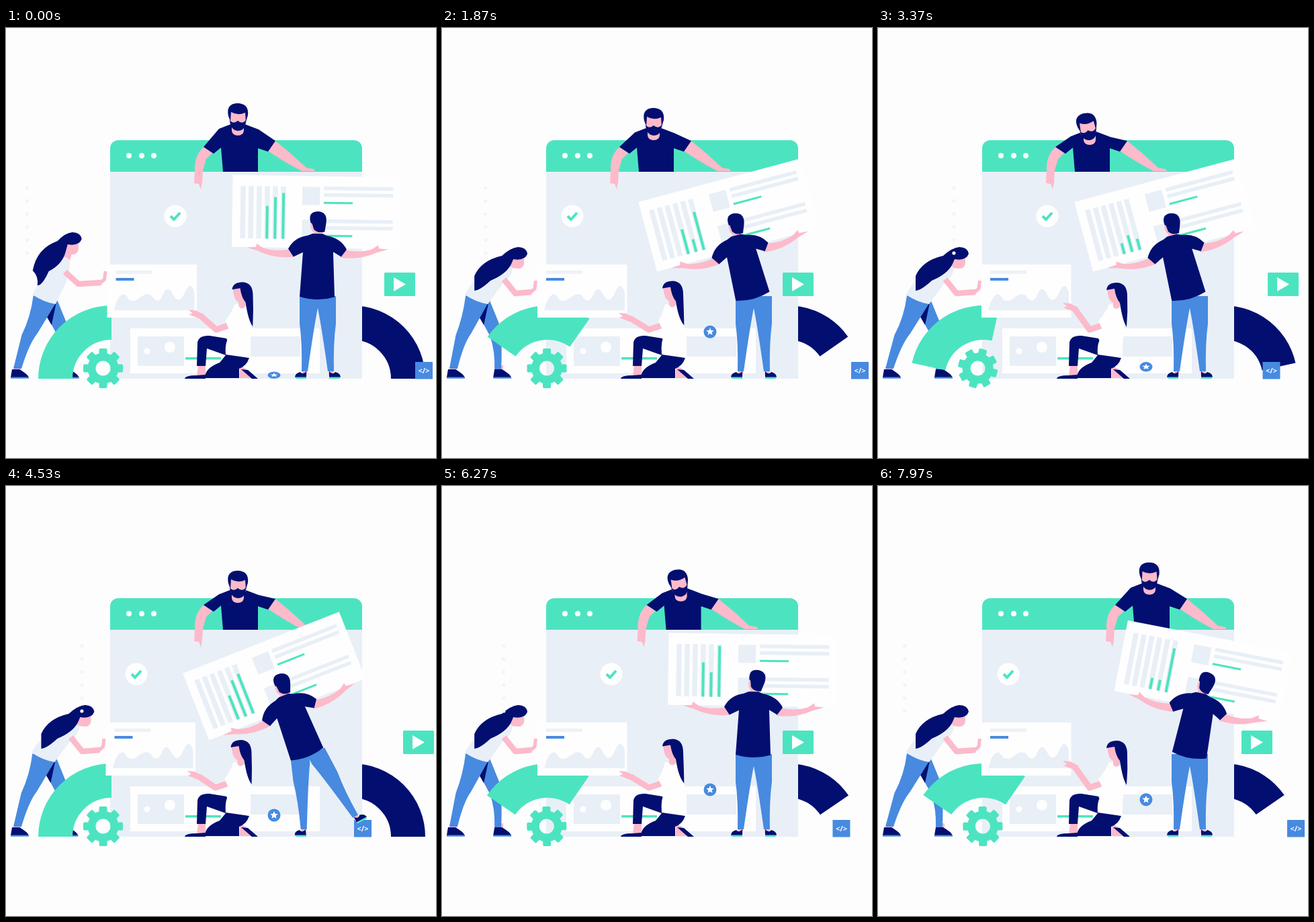
These frames come from a looping animation (640x640 px, 8 s). An HTML page with a canvas:

```html
<!DOCTYPE html>
<html lang="en">
<head>
<meta charset="utf-8">
<title>Building a page together</title>
<style>
  html, body { margin: 0; width: 100%; height: 100%; overflow: hidden; background: #fdfdfd; }
  canvas { display: block; width: 100vw; height: 100vh; object-fit: contain; }
</style>
</head>
<body>
<canvas width="640" height="640"></canvas>
<script>
const ctx = document.querySelector('canvas').getContext('2d');
const LOOP = 8000, DEG = Math.PI / 180;
const WHITE = '#fefefe', PAPER = '#fdfdfd', PALE = '#e9eff7', GREEN = '#4ce4c0',
      NAVY = '#020f70', BLUE = '#478ae0', SKIN = '#fcbacb', GREY = '#eef1f5';

// Sine easing through a few points [time, value, time, value, ...]; equal neighbours hold.
function track(t, keys) {
  if (t <= keys[0]) return keys[1];
  for (let i = 2; i < keys.length; i += 2) {
    if (t > keys[i]) continue;
    const p = (t - keys[i - 2]) / (keys[i] - keys[i - 2]);
    return keys[i - 1] + (keys[i + 1] - keys[i - 1]) * (1 - Math.cos(Math.PI * p)) / 2;
  }
  return keys[keys.length - 1];
}
// 0 at each multiple of the period, thrown up to 1, a pause, and falling back.
function bounce(t, period, rise) {
  const phase = t % period;
  const p = Math.min(1, Math.min(phase, period - phase) / rise);
  return 1 - (1 - p) ** 2;
}
const wave = (t, period, peak) => Math.cos(2 * Math.PI * (t - peak) / period);

function fill(color, d) {
  ctx.fillStyle = color;
  ctx.fill(new Path2D(d));
}
function rect(color, x, y, w, h, radius = 0) {
  ctx.fillStyle = color;
  ctx.beginPath();
  ctx.roundRect(x, y, w, h, radius);
  ctx.fill();
}
function ellipse(color, x, y, rx, ry = rx) {
  ctx.fillStyle = color;
  ctx.beginPath();
  ctx.ellipse(x, y, rx, ry, 0, 0, 7);
  ctx.fill();
}
function line(color, width, d) {
  ctx.strokeStyle = color;
  ctx.lineWidth = width;
  ctx.lineJoin = 'round';
  ctx.stroke(new Path2D(d));
}
function group(x, y, draw) {
  ctx.save();
  ctx.translate(x, y);
  draw();
  ctx.restore();
}
function turn(x, y, degrees, draw) {
  group(x, y, () => {
    ctx.rotate(degrees * DEG);
    ctx.translate(-x, -y);
    draw();
  });
}
function mirror(width, draw) {
  group(width, 0, () => {
    ctx.scale(-1, 1);
    draw();
  });
}

function quarterRing(color, x, degrees) {
  ctx.strokeStyle = color;
  ctx.lineWidth = 51;
  ctx.beginPath();
  ctx.arc(x, 522, 83.5, degrees * DEG, (degrees + 90) * DEG);
  ctx.stroke();
}

function gear(x, y, degrees) {
  turn(x, y, degrees, () => {
    ctx.strokeStyle = GREEN;
    ctx.lineWidth = 12;
    ctx.beginPath();
    ctx.arc(x, y, 17, 0, 7);
    ctx.stroke();
    for (let i = 0; i < 8; i++) turn(x, y, i * 45, () => rect(GREEN, x - 6, y - 29.5, 12, 11, 2));
  });
}

function windowFrame() {
  rect(GREEN, 155, 167, 375, 60, [12, 12, 0, 0]);
  rect(PALE, 155, 214, 375, 308);
  for (const x of [183, 202, 220]) ellipse(WHITE, x, 190, 4);
}

function panel() {
  rect(WHITE, 185, 447, 282, 67);
  rect(PALE, 196, 459, 69, 44);
  ellipse(WHITE, 244, 475, 8);
  ellipse(WHITE, 210, 481, 4.5);
  rect(GREEN, 267, 490, 53, 3.5);
  rect(PALE, 364, 459, 74, 30);
}

function checkBadge(x) {
  ellipse(WHITE, x, 280, 16.5);
  line(GREEN, 4, `M${x - 7} 280l5 5l9 -10`);
}

function starBadge(y) {
  const squash = 1 - Math.max(0, y - 491) * 0.018;
  group(399, y, () => {
    ctx.scale(1, squash);
    ellipse(BLUE, 0, 0, 9.5);
    let d = '';
    for (let i = 0; i < 10; i++) {
      const r = i % 2 ? 2.7 : 6, a = (i * 36 - 90) * DEG;
      d += (i ? 'L' : 'M') + r * Math.cos(a) + ' ' + r * Math.sin(a);
    }
    fill(WHITE, d + 'Z');
  });
}

function playBadge(x) {
  group(x, 364, () => {
    rect(GREEN, 0, 0, 46, 35, 1.5);
    fill(WHITE, 'M14 7V28L32 17.5Z');
  });
}

function codeBadge(x) {
  rect(BLUE, x, 497, 26, 25.5);
  ctx.fillStyle = WHITE;
  ctx.font = 'bold 11px "Open Sans", sans-serif';
  ctx.textAlign = 'center';
  ctx.fillText('</>', x + 13, 514);
}

function chartCard(x) {
  group(x, 352, () => {
    rect(WHITE, 0, 0, 133.5, 79);
    rect(GREY, 13, 9, 54, 5);
    rect(BLUE, 13, 20, 27, 4);
    fill(PALE, 'M10 68L14 55Q24 35 32 52Q40 57 48 50Q58 41 66 46Q76 62 83 45Q90 28 98 45Q106 60 114 45Q124 20 130 42V68Z');
  });
}

function dataCard(bars) {
  group(335, 220.5, () => {
    rect(WHITE, 0, 0, 250, 107);
    for (let i = 0; i < 6; i++) {
      rect(PALE, 12 + i * 12, 16, 7.5, 78);
      if (i > 2) rect(GREEN, 14 + i * 12, 94 - bars[i - 3], 4, bars[i - 3]);
    }
    for (const y of [16, 65]) {
      rect(PALE, 104, y, 26, 27);
      rect(PALE, 136, y - 1, 103, 5.5);
      rect(PALE, 136, y + 9, 103, 5.5);
      rect(GREEN, 136, y + 22, 43, 3);
    }
  });
}

function leaningMan(x, drop, tilt) {
  const s = drop * 0.8;
  group(x, 0, () => {
    fill(SKIN, 'M294 177L307 186L298 195L293 212L292 230L290 240L287 232L280 231L281 212Q280 190 294 177Z');
    fill(SKIN, 'M401 168L390 183Q415 200 440 213H460L458 210L447 208Q425 187 401 168Z');
    fill(NAVY, `M294 177L317 ${150 + s}L335 ${143 + s}H355L376 ${151 + s}L401 168L390 184L375 179V214H323L320 178L309 187Z`);
    group(0, drop, () => {
      fill(SKIN, 'M336 143H354V153Q353 160 345 160Q337 160 336 153Z');
      turn(345, 150, tilt, () => {
        fill(SKIN, 'M333 122H358V139Q356 149 345 149Q334 149 333 139Z');
        fill(NAVY, 'M331 131Q327 113 344 112Q362 112 360 130L357 140L356 126Q345 131 335 125L334 139Z');
        fill(NAVY, 'M333 137Q338 144 345 138Q352 144 357 137Q357 153 345 153Q334 152 333 137Z');
      });
    });
  });
}

function manLeg() {
  fill(SKIN, 'M441 509H448V517H440Z');
  fill(BLUE, 'M437 399H465V412Q459 440 449 511H440Q441 470 437 440Z');
  fill(NAVY, 'M430 520Q430 514 438 512Q442 517 447 511V520Z');
  fill(GREEN, 'M430 519.5H447V522H432Z');
}

function manArm() {
  fill(SKIN, 'M421 330Q398 334 381 328L372 322L371 327L357 328L374 333Q400 345 429 341Z');
}

function holdingMan(lean, headTurn, kick, bars) {
  const shift = -14 * kick;
  ctx.save();
  ctx.transform(1, 0, -shift / 122, 1, shift * 522 / 122, 0);
  manLeg();
  ctx.restore();
  group(shift, 0, () => {
    turn(470, 400, -28 * kick, () => mirror(928, manLeg));
    turn(460, 402, lean, () => {
      dataCard(bars);
      manArm();
      mirror(925, manArm);
      turn(462, 306, headTurn, () => {
        fill(SKIN, 'M452 287Q451 301 457 304V309H470V296Z');
        fill(NAVY, 'M452 290Q447 274 462 273Q477 273 475 290L473 303Q463 306 457 300L454 291Z');
      });
      fill(NAVY, 'M419 329Q428 312 448 309L455 306H470L476 309Q497 312 506 329L498 340L486 333L489 400Q463 408 437 400L441 334L427 341Z');
    });
  });
}

function shoe(x) {
  group(x, 0, () => {
    fill(SKIN, 'M5 502H15V512H5Z');
    fill(NAVY, 'M2 508L13 508Q25 515 27 520H0Z');
    rect(BLUE, 0, 519.5, 27, 2.2);
  });
}

function pushingWoman(w, lean, cardX) {
  // A point of the upright pose and how far leaning forward carries it.
  const at = (x, y, dx, dy) => `${x + dx * lean} ${y + dy * lean} `;
  shoe(7);
  shoe(71 + w);
  group(w, 0, () => {
    fill(BLUE, 'M46 406L66 406L79 438Q85 455 83 508H73Q74 480 66 458L54 436Z');
    fill(NAVY, 'M55 410L64 409L57 442L50 430Z');
  });
  fill(BLUE, `M${30 + w} 398Q${26 + w} 430 ${18 + w * .5} 457L11 507H23Q${30 + w * .4} 470 ${40 + w * .6} 455L${63 + w} 410Z`);
  group(w, 0, () => {
    fill(SKIN, 'M' + at(82, 318, 20, 21) + 'L' + at(97, 318, 20, 21) + 'V' + (330 + 21 * lean) +
      'Q' + at(95, 338, 20, 21) + at(87, 337, 20, 21) + 'L' + at(84, 347, 14, 10) + 'L' + at(72, 340, 14, 10) + 'Z');
    fill(PALE, 'M29 396Q44 368 ' + at(62, 344, 14, 12) + 'Q' + at(74, 336, 16, 12) + at(84, 345, 16, 12) +
      'Q' + at(86, 360, 14, 8) + at(79, 378, 5, 4) + 'L63 411Q45 408 29 397Z');
  });
  const handY = 362 + 14 * lean;
  line(SKIN, 8.5, `M${77 + 10 * lean + w} ${363 + 11 * lean}L${97 + 7 * lean + w} ${381 + 14 * lean}L${cardX - 9} ${379 + 14 * lean}`);
  line(SKIN, 5, `M${cardX - 11} ${380 + 14 * lean}L${cardX - 4} ${handY + 12}L${cardX - 2.5} ${handY}`);
  group(w, 0, () => fill(NAVY,
    'M' + at(102, 314, 20, 22) + 'Q' + at(100, 304, 20, 22) + at(88, 304, 20, 22) +
    'Q' + at(77, 305, 20, 22) + at(66, 317, 18, 22) + 'Q' + at(35, 328, 18, 18) + at(29, 361, 14, 8) +
    'Q' + at(38, 370, 5, 8) + at(36, 383, 7, 8) + 'Q' + at(43, 384, 9, 6) + at(53, 362, 14, 14) +
    'Q' + at(73, 352, 18, 14) + at(78, 333, 20, 18) + 'L' + at(81, 322, 20, 22) +
    'Q' + at(98, 325, 20, 22) + at(102, 314, 20, 22) + 'Z'));
}

function kneelingWoman(k, cardX) {
  fill(SKIN, 'M286 502H297V518H284Z');
  fill(SKIN, 'M348 503L357 507L366 521H348Z');
  fill(NAVY, 'M266 522Q267 517 284 517L297 516V522Z');
  fill(NAVY, 'M350 508L360 509L375 522H366Z');
  fill(NAVY, 'M284 503L285 468Q287 457 303 458L328 462L340 486L362 491Q358 503 347 507V521H296Q296 506 318 498L327 487L299 477L297 503Z');
  const handX = cardX + 121, handY = 427 - 3 * Math.max(0, k - 15);
  line(SKIN, 9, `M${325 + k * .5} 442L${303 + k * .6} 449L${handX + 17} ${handY + 5}`);
  group(handX, handY, () => fill(SKIN, 'M0 -3L11 -2L23 4L16 10L1 4L6 2Z'));
  fill(WHITE, `M${324 + k} 411L${350 + k} 414Q${359 + k * .4} 445 362 491L327 486Q325 465 ${329 + k * .4} 455L${324 + k * .5} 449L${318 + k * .5} 436Q${322 + k * .8} 425 ${324 + k} 411Z`);
  group(k, k * .2, () => {
    fill(SKIN, 'M321 382L336 379L340 403V411Q334 417 330 411V405Q322 402 321 382Z');
    fill(NAVY, `M320 386Q321 375 336 375Q351 376 351 395Q352 418 ${354 - k * .2} 441Q344 432 340 405Q334 398 332 384Z`);
  });
}

function draw(t) {
  const spin = track(t % 5000, [0, 0, 1400, 35, 2920, 35, 3680, 0]);
  const push = track((t + 3100) % 4400, [0, 0, 1310, 20, 2650, 20, 4300, 0]);
  const cardX = 134 + push;
  const alert = track(t, [0, 0, 1000, 1]);
  const lean = track(t, [0, 0.8, 1700, -15, 3370, -15, 4530, -21.5, 5900, 0.8, 6270, 0.8, 7970, 11]);
  const kick = track(t, [3700, 0, 4450, 1, 4600, 1, 5700, 0]);
  const bars = [
    36 + 20 * wave(t, 5000, 700),
    37 + 25 * wave(t, 5000, 0),
    45 + 31 * wave(t, 2000, 230)
  ];

  rect(PAPER, 0, 0, 640, 640);
  quarterRing(NAVY, 515, 270 - spin);
  windowFrame();
  leaningMan(
    track(t, [0, 0, 1500, -30, 3400, -30, 4530, 0, 5530, -30, 7100, 59]),
    14 * bounce(t, 2000, 450),
    track(t % 2500, [450, 0, 560, -12, 1300, -12, 1750, 0]));
  checkBadge(track(t % 3333, [247, 252, 1147, 194, 1940, 194, 2840, 252]));
  panel();
  starBadge(517 - 65 * bounce(t, 1111, 370));

  pushingWoman(push * 0.65, alert, cardX);
  quarterRing(GREEN, 157, 180 + spin);
  gear(144.5 + spin * 0.33, 506.5, spin / 35 * 45);
  chartCard(cardX);
  kneelingWoman(push, cardX);

  codeBadge(track(t, [2600, 609, 4366, 518, 4600, 518, 5530, 565, 7300, 609]));
  holdingMan(lean, 13 * alert, kick, bars);
  playBadge(track(t, [0, 563, 350, 591, 1600, 507, 2300, 507, 3700, 591, 4600, 591, 5450, 507, 6300, 507, 7970, 541]));

  const dotsX = 31 + 82 * bounce(t, 2000, 550);
  for (let i = 0; i < 6; i++) ellipse('#f3f4f6', dotsX, 238 + i * 19.4, 2.6);
}

function frame(now) {
  draw(now % LOOP);
  requestAnimationFrame(frame);
}
requestAnimationFrame(frame);
</script>
</body>
</html>
```
